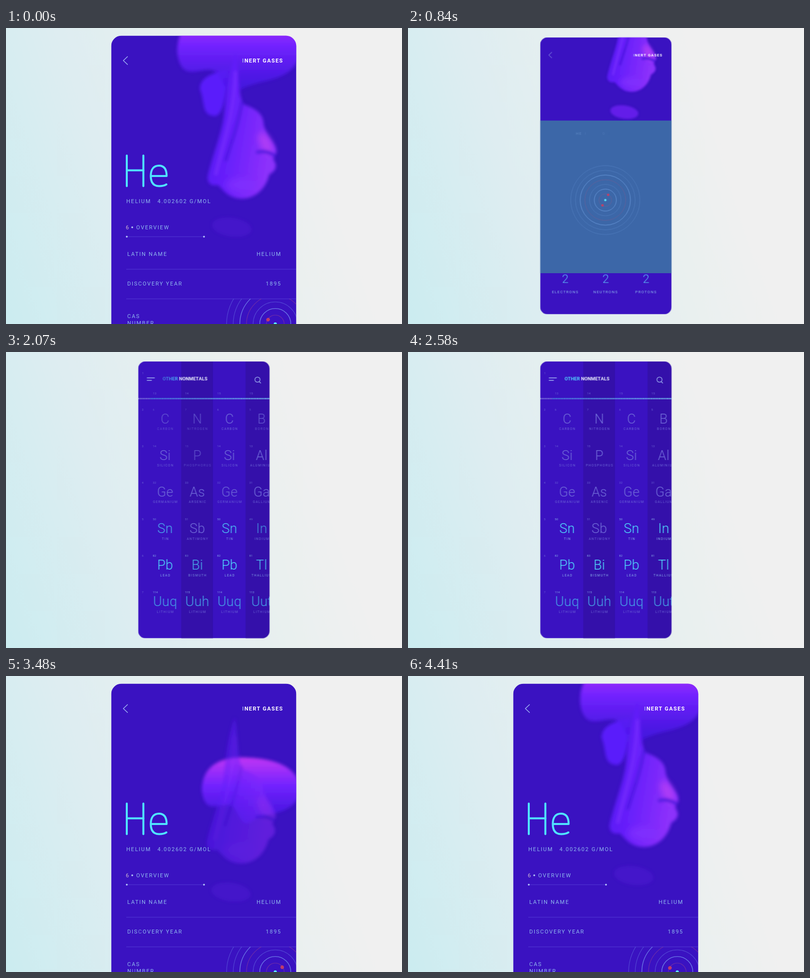
An HTML page for the animation above (4.44 s loop, 800 by 600 pixels).

```html
<!DOCTYPE html>
<html lang="en">
<head>
<meta charset="utf-8">
<title>Element card</title>
<style>
html, body { margin: 0; width: 100%; height: 100%; overflow: hidden; }
body { background: linear-gradient(72deg, #cbecf0 0%, #deedf1 30%, #e9f0ef 58%, #f0f0f0 76%); }
svg { display: block; width: 100vw; height: 100vh; }
text { font: 400 11px Roboto, Inter, sans-serif; letter-spacing: 1.75px; fill: #8fb8ee; white-space: pre; }
.line { fill: none; stroke: #a3b8f4; stroke-width: 1.3; stroke-linecap: round; stroke-linejoin: round; }
.rule { stroke: #8c8cff; stroke-opacity: .32; }
.glyph { fill: none; stroke: #50e4ff; stroke-width: 4; stroke-linecap: round; stroke-linejoin: round; }
.pen { stroke-dasharray: 1 2; }
.fold { fill: none; stroke-linecap: round; }
.mid-x { text-anchor: middle; }
.end-x { text-anchor: end; }
.count { font-size: 34px; font-weight: 300; letter-spacing: 0; fill: #5cb4f4; }
.head { font-weight: 700; fill: #fff; letter-spacing: 1.4px; }
.title { font-weight: 700; font-size: 13.5px; letter-spacing: 0; fill: #eef4ff; }
.conf { font-size: 12.5px; letter-spacing: .5px; fill: #cfeaff; }
.sym { font-size: 27px; font-weight: 300; letter-spacing: .3px; }
.name { font-size: 6.3px; letter-spacing: 1.5px; }
.num { font-size: 5.6px; letter-spacing: .3px; }
.dim { fill: #716cd9; }
.half { fill: #48a9ea; }
.lit { fill: #52e2ff; }
</style>
</head>
<body>
<svg viewBox="0 0 800 600">
  <defs>
    <clipPath id="phone"><rect x="212.500" y="15.500" width="374" height="791" rx="21"/></clipPath>
    <clipPath id="open"><rect x="212" y="15" width="376" height="792" style="transform-origin:0 544px" data-a="open ease-in-out"/></clipPath>
    <clipPath id="cell"><rect x="212" y="549" width="376" height="102" style="transform-origin:0 600px" data-a="cell"/></clipPath>
    <filter id="soft" filterUnits="userSpaceOnUse" x="200" y="-150" width="450" height="700">
      <feGaussianBlur stdDeviation="3"/>
    </filter>
    <filter id="cyan" filterUnits="userSpaceOnUse" x="200" y="-150" width="450" height="700" color-interpolation-filters="sRGB">
      <feGaussianBlur stdDeviation="3"/>
      <feColorMatrix values=".6 0 0 0 -.05  .9 0 0 0 .25  0 0 0 0 1  0 0 0 1 0"/>
    </filter>
    <filter id="haze" x="-100%" y="-100%" width="300%" height="300%"><feGaussianBlur stdDeviation="6"/></filter>
    <linearGradient id="capFill" x2="0" y2="1">
      <stop stop-color="#c236f4"/><stop offset=".42" stop-color="#7424ff"/><stop offset="1" stop-color="#4315e6" stop-opacity=".7"/>
    </linearGradient>
    <linearGradient id="bodyFill" x2="1" y2=".35">
      <stop stop-color="#4d18f0"/><stop offset=".5" stop-color="#6820fb"/><stop offset="1" stop-color="#8c30fb"/>
    </linearGradient>
    <linearGradient id="dots" gradientUnits="userSpaceOnUse" x1="267" x2="533" y1="0" y2="0">
      <stop stop-color="#7a72dc"/><stop offset=".08" stop-color="#7a72dc"/><stop offset=".1" stop-color="#4a86e0"/><stop offset="1" stop-color="#78c8f4"/>
    </linearGradient>
  </defs>

  <g data-a="zoom ease-in-out"><g clip-path="url(#phone)">
    <rect x="212" y="15" width="376" height="793" fill="#3a12c1"/>

    <g data-a="sheet">
      <g id="grid" transform="scale(1.4092) translate(-116.2 -8)">
        <path d="M354 19h64v562h-64zM484 19h50v562h-50z" fill="#3410aa"/>
        <path d="M267 94.5H533" stroke="url(#dots)" stroke-width="3" stroke-dasharray="2 1.2"/>
        <path class="line" d="M285 52.5H300M285 57.5H294M512 60.5L514.5 63"/>
        <circle class="line" cx="508" cy="56" r="5.2"/>
      </g>
    </g>

    <g filter="url(#soft)" data-a="smoke">
      <g id="plume" data-a="rise">
        <ellipse cx="456" cy="404" rx="40" ry="19" transform="rotate(8 456 404)" fill="#6a22f0" data-a="ghost"/>
        <path data-a="lobe" fill="#5a1cfb" d="M448 85C445 130 440 185 418 178C395 175 402 150 392 125C390 100 420 90 448 85Z"/>
        <path data-a="cap" fill="url(#capFill)" d="M376 110C376 40 430 22 490 25C580 28 625 60 625 110C610 175 540 160 500 188C475 205 470 165 455 150C430 130 385 180 376 110Z"/>
        <g data-a="body">
          <path fill="url(#bodyFill)" d="M464 50C472 110 470 145 482 156C505 163 518 175 520 190C521 215 545 232 546 248C547 260 538 260 541 268C549 280 545 290 532 297C525 325 505 345 478 346C450 346 440 330 428 318C412 322 405 312 408 298C420 250 435 215 440 180C445 140 446 100 464 50Z"/>
          <ellipse cx="524" cy="234" rx="11" ry="24" fill="#b840f5" opacity=".8" filter="url(#haze)" transform="rotate(-25 524 234)"/>
          <ellipse cx="475" cy="318" rx="30" ry="14" fill="#8230ff" opacity=".7" filter="url(#haze)"/>
          <path class="fold" stroke="#3c14d4" stroke-width="6" opacity=".6" d="M477 150C470 190 458 225 444 268"/>
          <path class="fold" stroke="#7a2cff" stroke-width="6" opacity=".8" d="M464 90C460 180 442 220 424 296"/>
          <path class="fold" stroke="#4316dc" stroke-width="6" d="M508 252Q524 247 542 258"/>
        </g>
      </g>
    </g>

    <g id="detail" data-a="detail">
      <path class="rule" d="M243 489H587M243 549H587M244 423H400"/>
      <g fill="#b9cdfa"><circle cx="244" cy="423" r="1.8"/><circle cx="400" cy="423" r="1.8"/><circle cx="255" cy="404" r="1.8"/></g>
      <path class="line" d="M245.500 58L237 66L245.500 74" data-a="chevron"/>
      <path class="line" d="M253 66H237M240.500 62.500L237 66L240.500 69.500" data-a="arrow"/>
      <path class="glyph" d="M296 320V266H314Q327 266 327 279.500Q327 293 314 293H297M311 293L325 319" data-a="early"/>
    </g>
    <g id="title" data-a="title ease-in-out"></g>

    <g data-a="panel">
      <g clip-path="url(#open)">
        <rect x="212" y="15" width="376" height="793" fill="#3c67a8"/>
        <g id="cool" filter="url(#cyan)"></g>
      </g>
      <g id="info"></g>
      <path class="line" d="M411 709L379 741M379 709L393 722.500M399 729L411 741" data-a="cross"/>
    </g>

    <g clip-path="url(#cell)"><g data-a="fadeAtom"><g data-a="atomX ease-in-out"><g data-a="atomY ease-in-out" id="atom"></g></g></g></g>
  </g></g>
</svg>
<script>
const LOOP = 4440, $ = id => document.getElementById(id);
let css = '', seed = 11;
const rnd = n => (seed = seed * 16807 % 2147483647) / 2147483647 * n;

// keyframes from { ms: declarations }
const keys = (name, frames) => {
  const list = Object.entries(frames).map(([t, v]) => `${(t / LOOP * 100).toFixed(3)}%{${v}}`);
  css += `@keyframes ${name}{${list.join('')}}\n`;
};
// a property leaves its rest value during t0..t1 and comes back during t2..t3
const swing = (name, prop, rest, other, t0, t1, t2, t3) => {
  const a = `${prop}:${rest}`, b = `${prop}:${other}`;
  keys(name, { 0: a, [t0]: a, [t1]: b, [t2]: b, [t3]: a, [LOOP]: a });
};
const fadeIn = (name, ...t) => swing(name, 'opacity', 0, 1, ...t);
const fadeOut = (name, ...t) => swing(name, 'opacity', 1, 0, ...t);
const play = (el, name, delay = 0, ease = 'linear') => {
  el.style.animation = `${name} ${LOOP}ms ${ease} ${delay ? delay - LOOP : 0}ms infinite`;
};
const add = (parent, tag, attrs = {}, text) => {
  const el = document.createElementNS('http://www.w3.org/2000/svg', tag);
  for (const k in attrs) el.setAttribute(k, attrs[k]);
  if (text) el.textContent = text;
  return parent.appendChild(el);
};
const write = (parent, x, y, str, cls = '') => add(parent, 'text', { x, y, class: cls }, str);
// text whose letters each run the same keyframes with their own delay
const type = (parent, x, y, str, name, delay, cls) => {
  const t = write(parent, x, y, '', cls);
  [...str].forEach((ch, i) => play(add(t, 'tspan', {}, ch), name, delay(i)));
  return t;
};

// camera and pages: the detail page swaps to the table when the panel starts to fade
const SWAP = 1640, SHUT = 1950;
swing('zoom', 'transform', 'translate(0px,0px) scale(1)', 'translate(116.2px,8px) scale(.7096)', 30, 540, 2700, 3040);
swing('open', 'transform', 'scaleY(0)', 'scaleY(1)', 640, 1020, SHUT, SHUT + 1);
fadeOut('panel', SWAP, 1900, 4000, 4001);
fadeIn('sheet', SWAP - 1, SWAP, 2750, 2980);
fadeOut('detail', SWAP - 1, SWAP, 2850, 2980);
fadeOut('smoke', SWAP - 1, SWAP, 2900, 3040);
fadeOut('chevron', SWAP, SWAP + 1, 3240, 3360);
fadeIn('arrow', 2900, 2980, 3240, 3360);
fadeIn('early', 2960, 3050, 3080, 3180);
fadeIn('cross', 1050, 1250, SHUT, SHUT + 1);
fadeIn('cellIn', 1740, 1980, 2710, 2840);
swing('letter', 'fill-opacity', 1, 0, 1650, 1690, 2950, 3090);
swing('label', 'fill-opacity', 0, 1, 780, 880, 2220, 2240);
swing('gone', 'fill-opacity', 0, 1, 1700, 1950, 2940, 2990);
swing('title', 'transform', 'translateX(0px)', 'translateX(136px)', 2740, 3010, 4000, 4001);

// detail page
const upTo = n => () => 1 + rnd(n);
const detail = $('detail');
const put = (x, y, str, cls) => type(detail, x, y, str, 'letter', upTo(420), cls);
put(243, 355, 'HELIUM');
put(306, 355, '4.002602 G/MOL');
put(242, 408, '6').style.fill = '#cdb9cf';
put(263, 408, 'OVERVIEW');
[['LATIN NAME', 'HELIUM'], ['DISCOVERY YEAR', '1895']].forEach(([label, value], i) => {
  put(245, 462 + 60 * i, label);
  put(556.5, 462 + 60 * i, value, 'end-x');
});
put(245, 588, 'CAS');
put(245, 602, 'NUMBER');
const inert = type(detail, 477, 70, 'INERT GASES', 'letter', i => 180 + i * 22, 'head');
inert.firstChild.style.fill = '#9fa8ee';
['ELECTRONS', 'NEUTRONS', 'PROTONS'].forEach((s, i) => {
  const x = 284 + 115 * i;
  write(detail, x, 717, '2', 'count mid-x');
  write(detail, x, 746, s, 'mid-x');
});

// panel
const info = $('info');
type(info, 314, 294, 'HELIUM', 'label', upTo(330));
type(info, 377, 294, '4.002602 G/MOL', 'label', upTo(330));
['ELECTRON', 'CONFIGURATION'].forEach((s, i) => {
  const t = type(info, 399.7, 623 + 18 * i, s, 'label', () => 220 + rnd(200), 'conf mid-x');
  if (!i) t.style.fill = '#5fd4ff';
});

const title = type($('title'), 282, 70, 'OTHER NONMETALS', 'gone', i => 1 + (14 - i) * 17, 'title');
[...title.children].slice(0, 5).forEach(s => s.style.fill = '#52d8ff');

// big symbol, drawn stroke by stroke
swing('penDetail', 'stroke-dashoffset', 0, 1.1, SWAP, SWAP + 1, 3120, 3480);
swing('penPanel', 'stroke-dashoffset', 1.1, 0, 880, 1220, SHUT, SHUT + 1);
const helium = (parent, name, dx, dy) => {
  const g = add(parent, 'g', { transform: `translate(${dx} ${dy})` });
  ['M244 258.500V320.500', 'M277.500 258.500V320.500', 'M244 288.500H277.500',
   'M293.500 300H324.500C324.500 286 319 279 309 279C298 279 292.500 287 292.500 300C292.500 313 298 320.500 309.500 320.500C316 320.500 320 319.500 324 317']
    .forEach(d => play(add(g, 'path', { d, class: 'glyph pen', pathLength: 1 }), name));
};
helium(detail, 'penDetail', 0, 0);
helium(info, 'penPanel', 115.5, -61);

// periodic table: the third column repeats the first
const grid = $('grid');
const rows = [
  [6, 'C CARBON', 'N NITROGEN', 'B BORON'],
  [14, 'Si SILICON', 'P PHOSPHORUS', 'Al ALUMINIUM'],
  [32, 'Ge GERMANIUM', 'As ARSENIC', 'Ga GALLIUM'],
  [50, 'Sn TIN', 'Sb ANTIMONY', 'In INDIUM'],
  [82, 'Pb LEAD', 'Bi BISMUTH', 'Tl THALLIUM'],
  [114, 'Uuq LITHIUM', 'Uuh LITHIUM', 'Uut LITHIUM']];
write(grid, 275, 45, '1', 'num dim');
rows.forEach(([z, a, b, d], r) => {
  const y = 145 + r * 74.1;
  write(grid, 274.5, y - 26, String(r + 2), 'num dim');
  [a, b, a, d].forEach((item, c) => {
    const [sym, name] = item.split(' '), x = 321.5 + c * 65;
    const metal = r > 3 || r === 3 && c !== 1, tone = metal ? '' : ' dim';
    const g = add(grid, 'g');
    play(g, 'cellIn', 1 + rnd(190));
    write(g, x - 25, y - 26, String(z + [0, 1, 0, -1][c]), 'num' + tone);
    write(g, x, y, sym, 'sym mid-x ' + (r === 5 ? 'half' : metal ? 'lit' : 'dim'));
    write(g, x + .7, y + 13.3, name, 'name mid-x' + (r === 5 ? ' dim' : tone));
    if (!r) write(grid, x - 24.5, 86, String(Math.min(13 + c, 15)), 'num dim');
  });
});

// atom: evenly spaced rings, every third one bright
swing('atomX', 'transform', 'translateX(544px)', 'translateX(398px)', 500, 840, SHUT, SHUT + 1);
swing('atomY', 'transform', 'translateY(600px)', 'translateY(455px)', 500, 980, SHUT, SHUT + 1);
swing('cell', 'transform', 'scaleY(1)', 'scaleY(9)', 560, 700, SHUT, SHUT + 1);
fadeOut('fadeAtom', SWAP, 1850, 2950, 3350);
keys('spin', { 0: 'transform:rotate(31deg)', 1560: 'transform:rotate(193deg)', [LOOP]: 'transform:rotate(391deg)' });
const atom = $('atom');
for (let i = 0; i < 7; i++) {
  const bright = i % 3 === 1, red = i % 3 === 0 && i < 6;
  add(atom, 'circle', {
    r: 18 + 13.4 * i, fill: 'none', 'stroke-width': bright ? 1.4 : 1.1,
    stroke: red ? 'rgba(190,90,130,.42)' : `rgba(140,190,255,${bright ? .6 : .32})`
  });
}
add(atom, 'circle', { r: 3.2, fill: '#5ce6ff' });
const spin = add(atom, 'g');
play(spin, 'spin');
for (const cx of [-17, 17]) add(spin, 'circle', { cx, r: 2.7, fill: '#b03a70', stroke: '#d8425c', 'stroke-width': 1.5 });

// smoke: everything rises together, the cap and lobe unfold on the way
const shift = (x, y, sx = 1, sy = sx) => `transform:translate(${x}px,${y}px) scale(${sx},${sy});`;
keys('rise', { 0: shift(0, 0), 840: shift(-4, -175), 1560: shift(-9, -238), 1900: shift(-12, -265),
  1901: shift(0, 60), 3060: shift(0, 60), 3870: shift(-3, 10), [LOOP]: shift(0, 0) });
keys('cap', { 0: shift(-30, -60), 1900: shift(-30, -60), 1901: shift(199, 330, .5), 2800: shift(199, 330, .5),
  3060: shift(199, 243, .58), 3870: shift(3, -10), [LOOP]: shift(-30, -60) });
const drop = shift(-148, -27, 1.35, 1.3);
keys('lobe', { 0: shift(0, 0) + 'opacity:1', 1900: shift(0, 0) + 'opacity:1', 1901: drop + 'opacity:0',
  3500: drop + 'opacity:0', 3800: drop + 'opacity:1', [LOOP]: shift(0, 0) + 'opacity:1' });
fadeOut('body', 1900, 1901, 3200, 3800);
swing('ghost', 'opacity', .2, 1, 100, 1000, 1900, 1901);

$('cool').append($('plume').cloneNode(true));
document.querySelectorAll('[data-a]').forEach(el => {
  const [name, ease] = el.dataset.a.split(' ');
  play(el, name, 0, ease);
});
document.head.appendChild(document.createElement('style')).textContent = css;
</script>
</body>
</html>
```
